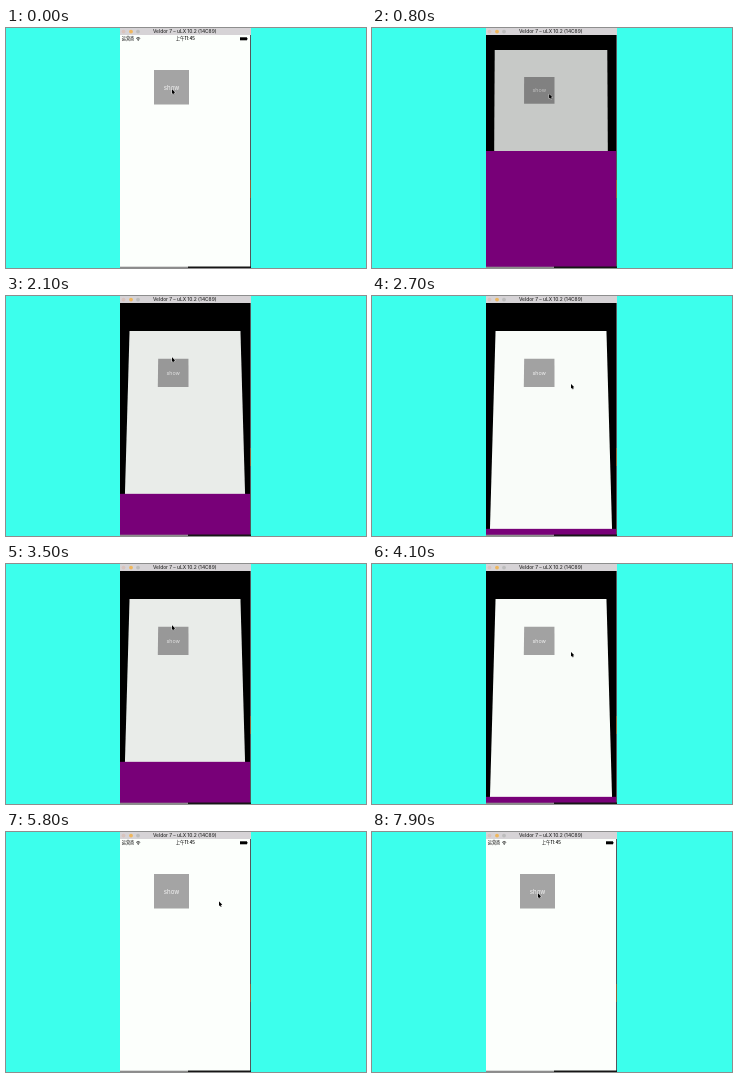
An HTML page with a canvas for the animation above (8000 ms loop, 360 px wide and 240 px high).

```html
<!DOCTYPE html>
<html lang="en">
<head>
<meta charset="utf-8">
<title>Modal sheet demo</title>
<style>
html, body { margin: 0; width: 100%; height: 100%; overflow: hidden; background: #3cffec; }
canvas { display: block; width: 360px; height: 240px; }
</style>
</head>
<body>
<canvas id="stage"></canvas>
<script>
const LOOP = 8000;
const canvas = document.getElementById('stage');
const ctx = canvas.getContext('2d');
const dpr = window.devicePixelRatio || 1;
canvas.width = 360 * dpr;
canvas.height = 240 * dpr;

const LEFT = 114, WIDTH = 130, TOP = 7, BOTTOM = 239, MID = LEFT + WIDTH / 2;

// Page poses: top y, bottom y, width ratio at top and bottom
const FLAT = [TOP, BOTTOM, 1, 1];
const TILT = [35, 235, 0.853, 0.94];
const OPEN = [22, 203, 0.865, 0.88];

// Pointer stops
const BUTTON = [166, 61.3], LEAVE = [179.5, 67], OUTSIDE = [199, 88], AWAY = [213, 69.5];

// Each round: press of the button, moment the sheet is nearly gone, pointer heads back, pointer arrives
const rounds = [
  [50, 1300, 1600, 1900],
  [1900, 2700, 3000, 3300],
  [3300, 4100, 4400, 4700],
  [4700, 5500, 6000, 6200],
  [6350, 7200, 7500, 7800]
];

const pose = [[0, FLAT]], sheet = [[0, [0]]], pointer = [[0, BUTTON]];
for (const [press, gone, leave, back] of rounds) {
  pose.push([press, FLAT], [press + 200, TILT], [press + 500, OPEN],
            [gone - 270, OPEN], [gone, TILT], [gone + 250, FLAT]);
  sheet.push([press, [0]], [press + 500, [1]], [gone - 270, [1]], [gone + 45, [0]]);
  pointer.push([press + 200, BUTTON], [gone - 300, LEAVE], [gone - 200, OUTSIDE],
               [gone, OUTSIDE], [gone + 300, AWAY], [leave, AWAY], [back, BUTTON]);
}

const ease = p => p * p * (3 - 2 * p);

function sample(keys, t) {
  let i = keys.length - 1;
  while (i > 0 && keys[i][0] > t) i--;
  const [t0, a] = keys[i];
  if (i === keys.length - 1) return a;
  const [t1, b] = keys[i + 1];
  const p = t1 > t0 ? ease((t - t0) / (t1 - t0)) : 1;
  return a.map((v, k) => v + (b[k] - v) * p);
}

function rect(x, y, w, h, color) {
  ctx.fillStyle = color;
  ctx.fillRect(x, y, w, h);
}

function poly(points, color) {
  ctx.fillStyle = color;
  ctx.beginPath();
  points.forEach(([x, y]) => ctx.lineTo(x, y));
  ctx.closePath();
  ctx.fill();
}

function dot(x, y, r, color) {
  ctx.fillStyle = color;
  ctx.beginPath();
  ctx.arc(x, y, r, 0, Math.PI * 2);
  ctx.fill();
}

function label(str, x, y, size, color, weight = 400) {
  ctx.font = `${weight} ${size}px Inter, "Noto Sans CJK SC", sans-serif`;
  ctx.fillStyle = color;
  ctx.textAlign = 'center';
  ctx.textBaseline = 'middle';
  ctx.fillText(str, x, y);
}

// Maps a point of the flat page to the tilted one
function projector([top, bottom, a, b]) {
  return (x, y) => {
    const v = (y - TOP) / (BOTTOM - TOP);
    const t = (v / b) / ((1 - v) / a + v / b);
    return [MID + (x - MID) * (a + (b - a) * t), top + (bottom - top) * t];
  };
}

function drawPage(state, dim) {
  const at = projector(state);
  const quad = (x0, y0, x1, y1) => [at(x0, y0), at(x1, y0), at(x1, y1), at(x0, y1)];
  const page = quad(LEFT, TOP, LEFT + WIDTH, BOTTOM);
  poly(page, '#fcfffc');
  const box = quad(148, 42, 183, 76.6);
  poly(box, '#a4a4a4');

  const [x, y] = at(165.5, 60.1);
  ctx.save();
  ctx.translate(x, y);
  ctx.scale((box[1][0] - box[0][0]) / 35, (box[2][1] - box[1][1]) / 34.6);
  label('show', 0, 0, 6.2, '#f4f4f4');
  ctx.restore();

  if (dim > 0) poly(page, `rgba(0,0,0,${0.21 * dim})`);
}

function drawStatus() {
  label('运营商', 122, 11, 4.2, '#000');
  label('上午11:45', 179.3, 11, 4.4, '#000', 500);
  ctx.strokeStyle = '#000';
  ctx.lineWidth = 0.7;
  for (const r of [1.5, 2.8]) {
    ctx.beginPath();
    ctx.arc(132.2, 12.4, r, -Math.PI * 0.76, -Math.PI * 0.24);
    ctx.stroke();
  }
  dot(132.2, 12.1, 0.6, '#000');
  rect(234, 9.3, 7, 3, '#000');
  rect(241.3, 10.2, 0.6, 1.2, '#000');
}

function drawWindow() {
  rect(LEFT, 0, WIDTH + 1, TOP, '#d6d3d6');
  dot(117.5, 3.6, 1.9, '#d9c3bd');
  dot(125, 3.6, 1.9, '#efb65c');
  dot(132, 3.6, 1.9, '#bcbcbc');
  label('Veldor 7 – uLX 10.2 (14C89)', 178.7, 3.8, 4.85, '#2c2c2c', 500);
  rect(LEFT + WIDTH, TOP, 1, 240 - TOP, '#54585c');
  rect(LEFT + WIDTH, 152, 1, 18, '#8e623c');
  rect(LEFT, 238.7, 68, 1.3, '#8c8c8c');
  rect(182, 238.5, 63, 1.5, '#161616');
}

function drawPointer([x, y]) {
  const shape = [[0, 0], [0, 5.2], [1.2, 4.2], [2, 6], [2.9, 5.6], [2.1, 3.9], [3.7, 3.8]];
  ctx.save();
  ctx.translate(x, y);
  ctx.scale(0.88, 0.88);
  ctx.lineJoin = 'round';
  ctx.strokeStyle = '#fff';
  ctx.lineWidth = 0.8;
  poly(shape, '#000');
  ctx.stroke();
  poly(shape, '#000');
  ctx.restore();
}

function draw(t) {
  const [up] = sample(sheet, t);
  const sheetTop = BOTTOM - up * (BOTTOM - 123);
  ctx.setTransform(dpr, 0, 0, dpr, 0, 0);
  rect(0, 0, 360, 240, '#3cffec');
  rect(LEFT, 0, WIDTH + 1, 240, '#000');
  drawPage(sample(pose, t), up);
  drawStatus();
  if (up > 0) rect(LEFT, sheetTop, WIDTH, BOTTOM - sheetTop, '#780078');
  drawWindow();
  drawPointer(sample(pointer, t));
}

const start = performance.now();
function tick() {
  draw((performance.now() - start) % LOOP);
  requestAnimationFrame(tick);
}
tick();
</script>
</body>
</html>
```
